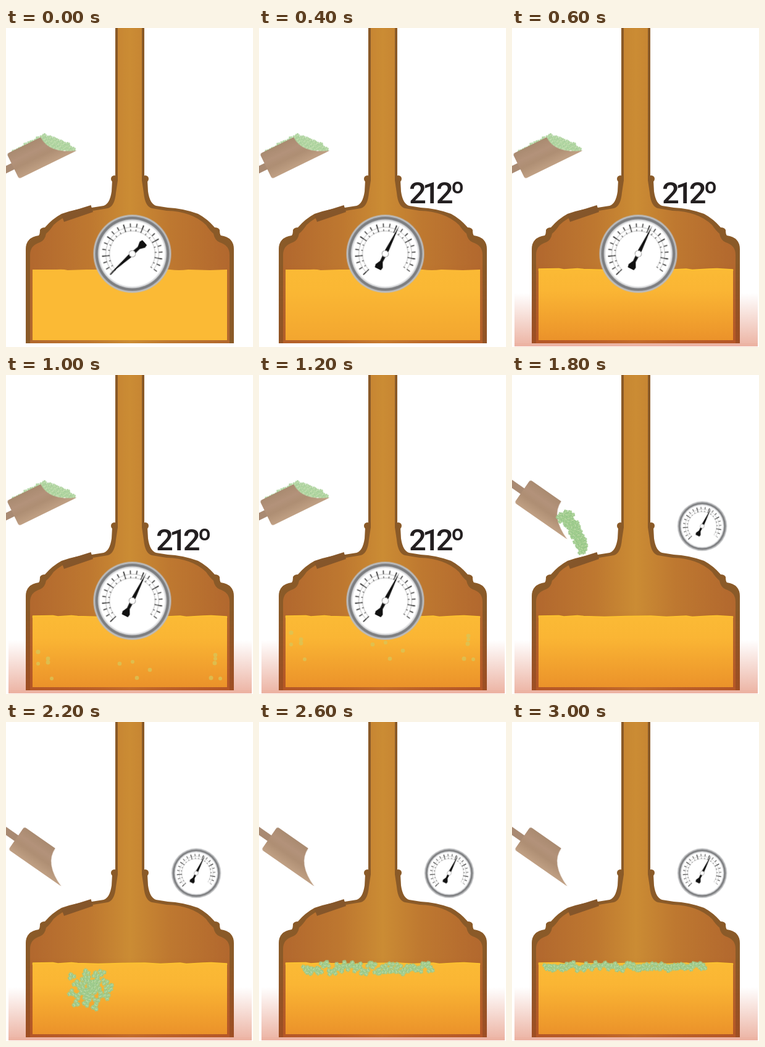
Recreate the animation shown at these times as an HTML page without scripts. Size 400 by 515 pixels, loop 5000 ms.

```html
<!DOCTYPE html>
<html lang="en">
<head>
<meta charset="utf-8">
<title>Brew kettle</title>
<style>
html, body { margin: 0; width: 100%; height: 100%; overflow: hidden; background: #fff; }
svg { display: block; width: 100%; height: 100%; }

/* every part holds its pose until the next beat */
.gauge, .needle, .label, .hot, .glow, .calm, .wave, .bubbles, .scoop, .load, .hops use {
  animation: 5s step-end infinite;
}
.gauge { animation-name: gauge; }
.needle { animation-name: needle; }
.label { animation-name: label; }
.hot { animation-name: hot; }
.glow { animation-name: glow; }
.calm { animation-name: calm; }
.wave { animation-name: wave; transform-origin: 200.5px 0; }
.bubbles { animation-name: bubbles; }
.scoop { animation-name: scoop; }
.load { animation-name: load; }

@keyframes gauge {
  0% { transform: translate(204.5px, 364.5px); }
  28%, 100% { transform: translate(308px, 244px) scale(.635); }
}
@keyframes needle {
  0% { transform: rotate(-132deg); }
  4% { transform: rotate(0deg); }
  8%, 100% { transform: rotate(26.6deg); }
}
@keyframes label { 0% { opacity: 0; } 4% { opacity: 1; } 28%, 100% { opacity: 0; } }
@keyframes hot { 0% { opacity: 0; } 8% { opacity: .5; } 12%, 100% { opacity: 1; } }
@keyframes glow { 0% { opacity: 0; } 12%, 100% { opacity: 1; } }
@keyframes calm { 0% { opacity: 1; } 12%, 100% { opacity: 0; } }
@keyframes wave {
  0% { opacity: 0; transform: none; }
  12% { opacity: 1; transform: none; }
  16% { opacity: 1; transform: scaleX(-1); }
  20%, 100% { opacity: 1; transform: none; }
}
@keyframes bubbles {
  0% { opacity: 0; }
  16% { opacity: .75; transform: translateY(40px); }
  20% { opacity: .75; transform: translateY(31px); }
  24% { opacity: .75; transform: none; }
  28%, 100% { opacity: 0; }
}
@keyframes scoop {
  0% { transform: translate(21px, 243.5px) rotate(-26deg); }
  32% { transform: translate(8px, 229px) rotate(2deg); }
  36%, 100% { transform: translate(4px, 206px) rotate(34.8deg); }
}
@keyframes load { 0% { opacity: .85; } 36%, 100% { opacity: 0; } }

/* hops: poured, dropped, scattered on a spiral, then spread along the surface */
.trio { rotate: calc(var(--i, 0) * 70deg); }
.hops use {
  --u: cos(var(--i) * 2.4rad);
  --v: sin(var(--i) * 2.4rad);
  --w: sin(var(--i) * var(--i) * 1.7rad);
  animation-name: hops;
}
@keyframes hops {
  0% { opacity: 0; }
  36% { opacity: 1; transform: translate(
    calc((82 + 1.5 * var(--i) - .016 * var(--i) * var(--i) + var(--u) * (8 - .15 * var(--i))) * 1px),
    calc((223 + 1.72 * var(--i) + var(--w) * 4) * 1px)); }
  40% { opacity: 1; transform: translate(
    calc((120 + var(--u) * .55 * var(--i)) * 1px),
    calc((363 + var(--v) * var(--i)) * 1px)); }
  44% { opacity: 1; transform: translate(
    calc((137 + var(--u) * (2 + var(--i)) + var(--w) * 4) * 1px),
    calc((430 + var(--v) * (2 + .9 * var(--i))) * 1px)); }
  48% { opacity: 1; transform: translate(
    calc((163 + var(--u) * 2.1 * var(--i)) * 1px),
    calc((416 + var(--v) * .55 * var(--i)) * 1px)); }
  52% { opacity: 1; transform: translate(
    calc((75 + 5.8 * var(--i)) * 1px),
    calc((397.5 + var(--w) * 6) * 1px)); }
  56% { opacity: 1; transform: translate(
    calc((55 + 7.2 * var(--i)) * 1px),
    calc((397 + var(--w) * 5) * 1px)); }
  60%, 100% { opacity: 1; transform: translate(
    calc((56 + 7.25 * var(--i)) * 1px),
    calc((395 + var(--w) * 3) * 1px)); }
}
</style>
</head>
<body>
<svg viewBox="0 0 400 515">
  <defs>
    <linearGradient id="copper" gradientUnits="userSpaceOnUse" x1="40" x2="361" y1="0" y2="0">
      <stop offset="0" stop-color="#b2682e"/>
      <stop offset=".3" stop-color="#be7830"/>
      <stop offset=".5" stop-color="#cb8c34"/>
      <stop offset=".7" stop-color="#be7830"/>
      <stop offset="1" stop-color="#b2682e"/>
    </linearGradient>
    <linearGradient id="heat" x2="0" y2="1">
      <stop offset="0" stop-color="#fbba35"/>
      <stop offset=".3" stop-color="#fab534"/>
      <stop offset="1" stop-color="#eb922a"/>
    </linearGradient>
    <linearGradient id="fire" x2="0" y2="1">
      <stop offset="0" stop-color="#fff"/>
      <stop offset="1" stop-color="#ecb3a3"/>
    </linearGradient>
    <linearGradient id="ember" gradientUnits="userSpaceOnUse" x1="0" x2="0" y1="380" y2="509">
      <stop offset="0" stop-color="#b8401e" stop-opacity="0"/>
      <stop offset="1" stop-color="#b8401e" stop-opacity=".45"/>
    </linearGradient>
    <linearGradient id="wood" x2="0" y2="1">
      <stop offset="0" stop-color="#a98a70"/>
      <stop offset=".35" stop-color="#b3927a"/>
      <stop offset=".6" stop-color="#ae8e73"/>
      <stop offset="1" stop-color="#c0a084"/>
    </linearGradient>

    <g id="hop">
      <circle r="2.7" fill="#bedca4" stroke="#9bca8a" stroke-width="2.2" stroke-dasharray="2.4 1"/>
      <path d="M-1.5 -.6h1M1 1.2h1" stroke="#70a97c" stroke-width="1.1"/>
    </g>
    <g id="trio" class="trio">
      <use href="#hop" x="-3.2" y="-2"/>
      <use href="#hop" x="3.4" y="-1.2"/>
      <use href="#hop" x="-.2" y="3.2"/>
    </g>
    <marker id="heap" orient="auto" markerUnits="userSpaceOnUse" markerWidth="16" markerHeight="16" viewBox="-8 -8 16 16">
      <use href="#trio"/>
    </marker>
  </defs>

  <rect class="glow" x="4" y="428" width="394" height="86" fill="url(#fire)"/>

  <!-- kettle: one half and its mirror image -->
  <g id="half">
    <path fill="#8a5a28" d="M32 509V357Q32 338 53 335Q55 333 55 326Q57 322 63 322Q75 308 90 300Q115 291 139 290L158 287Q168 284 171 264L172 246H177V0H202V509Z"/>
    <path fill="url(#copper)" d="M39 509V366Q39 351 55 346Q63 343 65 332Q71 327 77 318Q100 296 141 295L165 291Q176 288 178 266L181 246V0H202V509Z"/>
    <rect x="170" y="238" width="11" height="11" rx="5.5" fill="#8a5a28"/>
  </g>
  <use href="#half" transform="matrix(-1 0 0 1 401 0)"/>
  <path d="M89.5 301L137.5 286L141 297L94 313Z" fill="#85562a"/>
  <rect class="hot" x="32" y="380" width="337" height="129" fill="url(#ember)"/>
  <rect class="glow" x="4" y="509" width="394" height="5" fill="#ecb3a3"/>

  <!-- wort -->
  <rect x="43" y="391" width="315" height="113" fill="#fbba35"/>
  <path class="calm" fill="#fbba35" d="M43 392V390H82Q92 389 100 391L130 390H265Q280 392 295 390L330 391L358 390V392Z"/>
  <rect class="hot" x="43" y="391" width="315" height="113" fill="url(#heat)"/>
  <path class="wave" fill="#fbba35" stroke="#fdc52d" stroke-width="1.5" stroke-linejoin="round"
    d="M43.5 392V389L76 388.5L84 390L106 388.5L116 389.5L150 390.5L185 389.5L225 389L250 390.5L282 389L292 390.5L318 389L332 388.5L357.5 390V392"/>

  <g class="bubbles" fill="#d8c658">
    <circle cx="52" cy="416" r="3.6"/><circle cx="52" cy="435" r="3"/>
    <circle cx="68" cy="427" r="3.4"/><circle cx="68" cy="433" r="3.4"/>
    <circle cx="74" cy="459" r="3"/><circle cx="184" cy="435" r="3.3"/>
    <circle cx="205" cy="432" r="3"/><circle cx="212" cy="458" r="3.3"/>
    <circle cx="233" cy="445" r="3.3"/><circle cx="339" cy="421" r="3.3"/>
    <circle cx="339" cy="427" r="3"/><circle cx="338" cy="434" r="3.5"/>
    <circle cx="332" cy="458" r="3.5"/><circle cx="347" cy="459" r="3"/>
  </g>

  <!-- thermometer -->
  <g class="gauge">
    <circle r="63" fill="#bbbcbe"/>
    <circle r="60" fill="#7d7e80"/>
    <circle r="55.5" fill="#dcdddf"/>
    <circle r="53" fill="#fff"/>
    <g fill="none" stroke="#222" transform="rotate(-4)">
      <path stroke="#aaa" stroke-width=".8" d="M-32.8 27.8A43 43 0 1 1 32.8 27.8M-28.3 23.9A37 37 0 1 1 28.3 23.9"/>
      <path pathLength="260.4" stroke-width="6" stroke-dasharray="1.7 11.25" d="M-35.1 29.7A46 46 0 1 1 35.1 29.7"/>
      <path pathLength="260.4" stroke-width="12" stroke-dasharray="1.7 37.15" d="M-32.8 27.8A43 43 0 1 1 32.8 27.8"/>
      <path pathLength="260.4" stroke-width="3" stroke-dasharray="1.5 11.45" d="M-29 24.5A38 38 0 1 1 29 24.5"/>
    </g>
    <g class="needle">
      <path fill="#111" d="M0 -51L3 -6L2.4 14L6.5 22L5.4 27H-5.4L-6.5 22L-2.4 14L-3 -6Z"/>
      <circle r="5.3" fill="#fff" stroke="#777" stroke-width=".8"/>
    </g>
  </g>
  <text class="label" x="243" y="283" font-family="Roboto, sans-serif" font-size="49" font-weight="500" letter-spacing="-6" fill="#231f20">212<tspan dx="2">º</tspan></text>

  <!-- scoop -->
  <g class="scoop">
    <g class="load">
      <g transform="translate(1 4)">
        <path d="M12 -40V-47L60 -48L68 -47L102 -5L70 -20Z" fill="#b3d69f"/>
        <polyline fill="none" marker-start="url(#heap)" marker-mid="url(#heap)" marker-end="url(#heap)"
          points="14,-45 25,-45 36,-47 47,-46 58,-47 67,-45 66,-35 75,-38 74,-27 83,-29 83,-18 91,-20 93,-13 96,-10"/>
      </g>
    </g>
    <rect x="-45" y="-28" width="47" height="11" fill="#a98a72"/>
    <path fill="url(#wood)" d="M4 -45H61Q61 -15 104 0H4Q0 0 0 -4V-41Q0 -45 4 -45Z"/>
  </g>

  <g class="hops">
    <use href="#trio" style="--i:0"/><use href="#trio" style="--i:1"/><use href="#trio" style="--i:2"/>
    <use href="#trio" style="--i:3"/><use href="#trio" style="--i:4"/><use href="#trio" style="--i:5"/>
    <use href="#trio" style="--i:6"/><use href="#trio" style="--i:7"/><use href="#trio" style="--i:8"/>
    <use href="#trio" style="--i:9"/><use href="#trio" style="--i:10"/><use href="#trio" style="--i:11"/>
    <use href="#trio" style="--i:12"/><use href="#trio" style="--i:13"/><use href="#trio" style="--i:14"/>
    <use href="#trio" style="--i:15"/><use href="#trio" style="--i:16"/><use href="#trio" style="--i:17"/>
    <use href="#trio" style="--i:18"/><use href="#trio" style="--i:19"/><use href="#trio" style="--i:20"/>
    <use href="#trio" style="--i:21"/><use href="#trio" style="--i:22"/><use href="#trio" style="--i:23"/>
    <use href="#trio" style="--i:24"/><use href="#trio" style="--i:25"/><use href="#trio" style="--i:26"/>
    <use href="#trio" style="--i:27"/><use href="#trio" style="--i:28"/><use href="#trio" style="--i:29"/>
    <use href="#trio" style="--i:30"/><use href="#trio" style="--i:31"/><use href="#trio" style="--i:32"/>
    <use href="#trio" style="--i:33"/><use href="#trio" style="--i:34"/><use href="#trio" style="--i:35"/>
  </g>
</svg>
</body>
</html>
```
